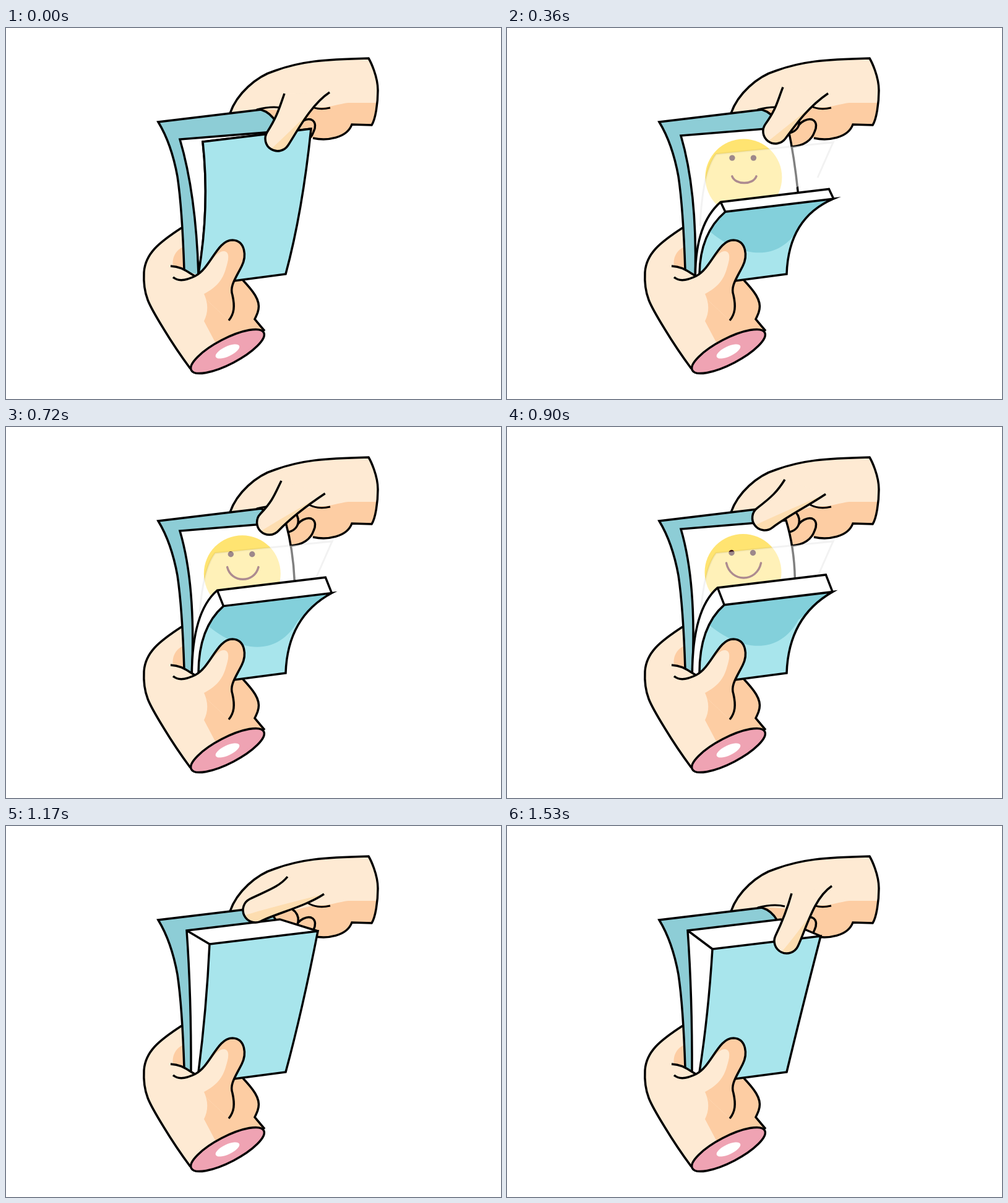
Animation of 800x600 px, one loop 1.62 s. Source, as an HTML page with a canvas:

```html
<!DOCTYPE html>
<html lang="en">
<head>
<meta charset="utf-8">
<title>Flip book</title>
<style>
html, body { margin: 0; width: 100%; height: 100%; overflow: hidden; background: #fff; }
canvas { display: block; width: 800px; height: 600px; }
</style>
</head>
<body>
<canvas id="stage" width="800" height="600"></canvas>
<script>
const ctx = document.getElementById('stage').getContext('2d');
const STEP = 90, STEPS = 18, LAST_PAGE = 12, REGRIP = 13;
const SKIN = '#feead3', PEACH = '#fdcda3', TINT = '#fdddb0', INK = '#000';
const COVER = '#a8e5ec', COVER_SHADE = '#83d0db', COVER_BACK = '#8dcdd6';
const WIDTH = [175, -21];   // top edge of the book

const clamp = v => Math.max(0, Math.min(1, v));
const mix = (a, b, f) => a + (b - a) * f;
const mixPt = (p, q, f) => [mix(p[0], q[0], f), mix(p[1], q[1], f)];
const add = (p, q, k = 1) => [p[0] + q[0] * k, p[1] + q[1] * k];

function draw(d, fill, stroke, width = 3.5) {
  const path = new Path2D(d);
  if (fill) { ctx.fillStyle = fill; ctx.fill(path); }
  if (stroke) { ctx.strokeStyle = stroke; ctx.lineWidth = width; ctx.stroke(path); }
}

function inside(d, paint) {
  ctx.save();
  ctx.clip(new Path2D(d));
  paint();
  ctx.restore();
}

function oval(x, y, rx, ry, turn, fill, stroke) {
  ctx.beginPath();
  ctx.ellipse(x, y, rx, ry, turn, 0, Math.PI * 2);
  ctx.fillStyle = fill;
  ctx.fill();
  if (stroke) { ctx.strokeStyle = stroke; ctx.lineWidth = 3.5; ctx.stroke(); }
}

// Book geometry: pages pile up with easing while the cover hangs open.
function bookAt(step) {
  const pile = 1 - (1 - clamp(step / LAST_PAGE)) ** 2;
  const bend = clamp(Math.min(step, LAST_PAGE - step) / 2);
  const lean = clamp((step - REGRIP) / 4);
  const back = mixPt([318 - 26 * pile, 184 - 15 * pile], [352 - 12 * pile, 310 - 51.5 * pile], bend);
  const front = mixPt([318 + 11 * pile + 3 * lean, 184 + 7 * pile + 8 * lean],
    [355 - 4 * pile, 310 - 23 * pile], bend);
  const base = 311 - 12 * pile;
  const handle = (p, foot) => [
    (p[0] + foot) / 2 + mix(15 - 11 * pile, -20, bend),
    p[1] + mix(106, 35, bend)
  ];
  return {
    back, front, base, bend,
    backEnd: add(back, WIDTH, mix(0.86, 1, bend)),
    frontEnd: add(front, WIDTH),
    backHandle: handle(back, base),
    frontHandle: handle(front, 311),
    sideHandle: mixPt([479 - 3 * lean, 298], [455, 307], bend)
  };
}

function upperHand() {
  const edge = 'M362 138C373 106 405 78 435 69C476 54 510 51 586 49C589 54 601 78 601 101' +
    'C601 122 597 148 591 157L559 156C551 178 519 183 496 178';
  draw(edge + 'L440 160Z', SKIN);
  inside(edge + 'L440 160Z', () =>
    draw('M610 121H553C535 123 522 130 500 128L470 135L412 131L440 190H610Z', PEACH));
  draw(edge, null, INK);
  draw('M405 132C425 127 438 127 449 130M487 124Q502 134 524 129', null, INK, 3);
  for (const [knuckle, close] of [
    ['M468 163C474 150 487 146 493 148C502 152 500 162 497 168C492 182 480 190 461 192', 'L450 185V150Z'],
    ['M463 135C476 143 477 165 456 170', 'L440 160Z']
  ]) {
    draw(knuckle + close, PEACH);
    draw(knuckle, null, INK);
  }
}

// Thumb grip: [step, left crease end, tip centre, right crease end]
const grips = [
  [0, [450, 106], [439, 179], [523, 104]],
  [7, [443, 88], [430, 158], [516, 107]],
  [13, [455, 82], [403, 136], [514, 110]],
  [17, [460, 109], [452, 186], [525, 97]]
];

function thumb(step) {
  const next = Math.max(1, grips.findIndex(g => g[0] >= step));
  const [from, to] = [grips[next - 1], grips[next]];
  const f = (step - from[0]) / (to[0] - from[0]);
  const [a, tip, b] = [1, 2, 3].map(i => mixPt(from[i], to[i], f));
  const r = 20;
  const way = add(tip, add(a, b), -0.5);
  const len = Math.hypot(...way);
  const u = [way[0] / len, way[1] / len];
  const n = [-u[1], u[0]];
  const left = add(tip, n, r), right = add(tip, n, -r);
  const outline = `M${a}C${add(add(a, u, 15), [0, 10])} ${add(left, u, -30)} ${left}` +
    `A${r} ${r} 0 0 0 ${right}C${add(right, u, -30)} ${add(b, [-30, 20])} ${b}`;
  draw(outline + 'Z', SKIN);
  inside(outline + 'Z', () =>
    draw(`M${add(tip, u, r)}Q${add(tip, [8, 0])} ${b}L${add(b, u, 90)}L${add(tip, u, 60)}Z`, TINT));
  draw(outline, null, INK);
}

function handShade() {
  draw('M328 381C340 366 346 360 353 361C363 363 359 377 355 390C350 407 341 419 320 430' +
    'C327 446 327 459 320 474L339 510L425 495V400L395 380L390 335H350L315 390Z', PEACH);
}

function lowerHand() {
  const left = 'M284 323C247 347 225 365 223 395C221 432 231 448 255 487Q275 520 298 551';
  const right = 'L402 471C404 466 407 462 408 455C411 440 399 425 383 408';
  const body = left + 'L418 490' + right + 'L310 350Z';
  draw(body, SKIN);
  inside(body, () => {
    handShade();
    draw('M286 354C272 361 268 374 270 386L290 393Z', PEACH);
  });
  draw(left + 'M418 490' + right, null, INK);
  oval(358, 523, 66, 20.5, -0.48, '#efa3b3', INK);
  oval(358, 523, 21, 8, -0.44, '#fff');
}

function lowerThumb() {
  const crease = 'M266 385C285 386 292 394 305 401';
  const tip = 'C331 388 341 343 366 343C387 344 389 369 381 385' +
    'C371 405 361 418 366 432C370 450 369 462 360 473';
  inside(crease + tip + 'Z', () => {
    draw('M200 300H450V500H200Z', SKIN);
    handShade();
  });
  draw(crease, null, INK);
  draw('M270 403C278 410 290 409 306 401' + tip, null, INK);
}

function backCover() {
  const edge = 'M288 392C286 330 283 280 277 240C271 207 260 175 246 152L412 132Q428 137 437 153';
  draw(edge + 'L420 260L312 400Z', COVER_BACK);
  draw(edge, null, INK);
}

// The drawn smile sinks and widens from page to page.
function face(step) {
  const cx = 383 - 0.15 * step, cy = 246 - 1.1 * step;
  oval(cx, cy, 62, 62, 0, '#ffe471');
  for (const dx of [-18.5, 16]) oval(cx + dx, cy - 31.5, 4.7, 4.7, 0, '#3a1016');
  const half = 14 + 1.4 * step, y = 253 - 3.3 * step;
  const low = y + (2 + 2.2 * step) / 0.75;
  ctx.lineCap = 'round';
  draw(`M${cx + 1 - half} ${y}C${cx + 1 - half * 0.75} ${low} ${cx + 1 + half * 0.75} ${low} ` +
    `${cx + 1 + half} ${y}`, null, '#5b1621');
  ctx.lineCap = 'butt';
}

function page(step, book) {
  const corner = [281, 180 - 1.5 * step], far = [456 - 0.5 * step, 166 - 1.5 * step];
  const foot = add(book.back, [125, -15]);
  const side = add(mixPt(far, foot, 0.5), [0.6 * step, -4]);
  const d = `M${book.base} 398Q307 ${corner[1] + 88} ${corner}L${far}Q${side} ${foot}`;
  draw(d + 'Z', '#fff');
  inside(d + 'Z', () => face(step));
  draw(d, null, INK);
  if (step > 0) fallingPage(step);
}

// A translucent page in flight, alternating between two heights.
function fallingPage(step) {
  const alpha = step < 3 ? 0.8 : 0.5;
  const drop = step % 2 * 23;
  const edge = `M312 320Q316 ${232 + drop} 338 ${204 + drop}L527 ${185 + drop}L502 ${242 + drop / 4}`;
  draw(edge + 'Q462 256 428 287Z', `rgba(255,255,255,${alpha})`);
  draw(edge, null, `rgba(0,0,0,${alpha * 0.1})`, 3);
}

function frontCover({ back, front, base, bend, backEnd, frontEnd, backHandle, frontHandle, sideHandle }) {
  const block = `M${base} 400Q${backHandle} ${back}L${backEnd}L${frontEnd}`;
  draw(`${block}L${front}Q${frontHandle} 311 398Z`, '#fff');
  draw(`${block}M${back}L${front}`, null, INK);
  const cover = `M311 398Q${frontHandle} ${front}L${frontEnd}Q${sideHandle} 452 398L368 409`;
  draw(cover + 'Z', COVER);
  if (bend > 0) {
    const [x, y] = front;
    inside(cover + 'Z', () =>
      draw(`M${x - 34} ${y + 24}C${x + 20} ${y + 74} ${x + 86} ${y + 86} ${x + 120} ${y + 24}` +
        `L${frontEnd}L${front}Z`, COVER_SHADE));
  }
  draw(cover, null, INK);
}

function render(step) {
  const book = bookAt(step);
  ctx.fillStyle = '#fff';
  ctx.fillRect(0, 0, 800, 600);
  upperHand();
  lowerHand();
  backCover();
  if (step < LAST_PAGE) page(step, book);
  frontCover(book);
  thumb(step);
  lowerThumb();
}

let shown = -1;
function tick() {
  const step = Math.floor(performance.now() / STEP) % STEPS;
  if (step !== shown) render(shown = step);
  requestAnimationFrame(tick);
}
tick();
</script>
</body>
</html>
```
